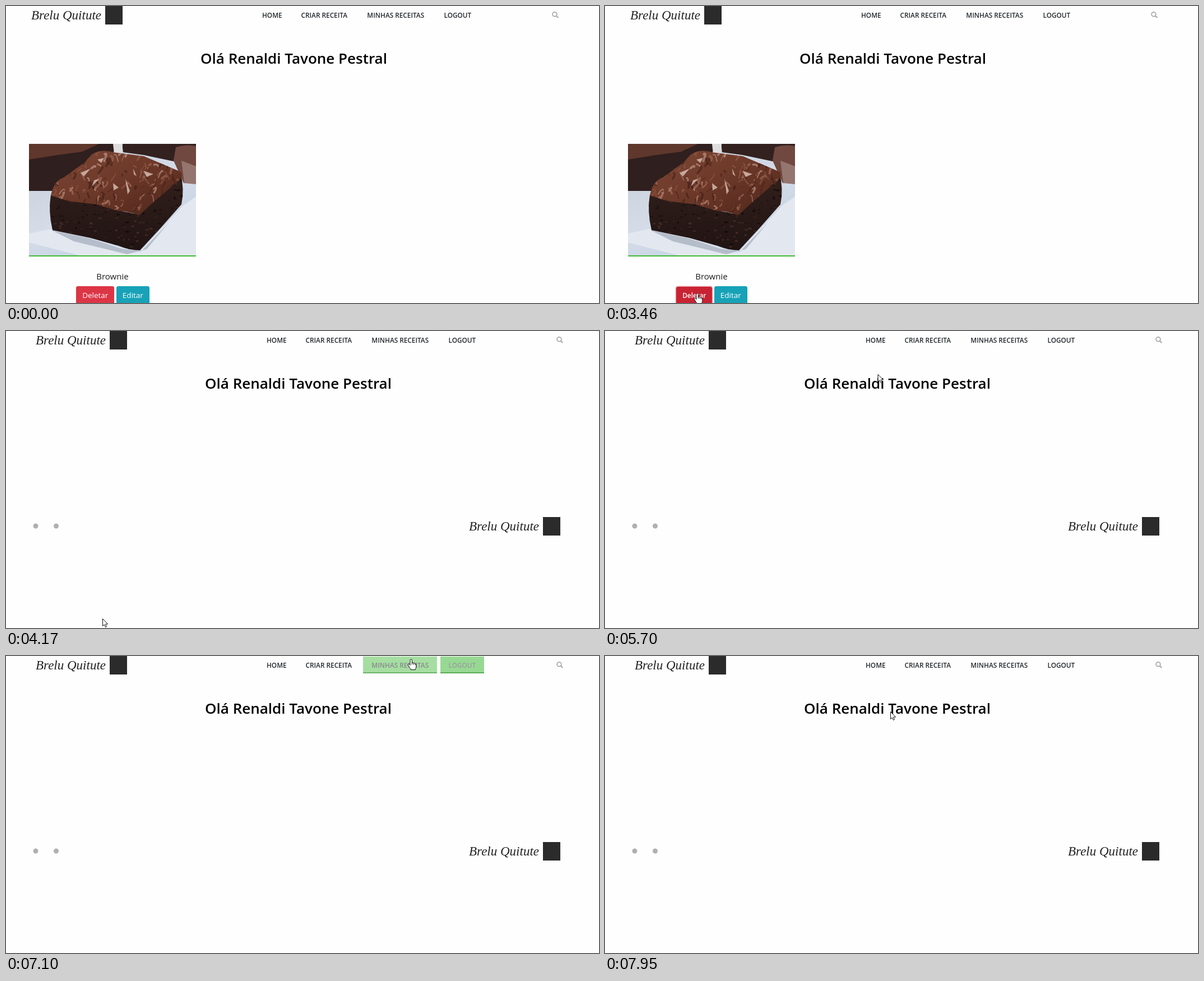
An HTML page that plays this animation: 1058 by 530 pixels, repeating every 8000 ms.

```html
<!DOCTYPE html>
<html lang="pt-BR">
<head>
<meta charset="utf-8">
<title>Minhas receitas</title>
<style>
@property --h { syntax: '<number>'; inherits: true; initial-value: 0; }
html, body { margin: 0; width: 100%; height: 100%; overflow: hidden; background: #fefefe; }
#stage { position: relative; width: 1058px; height: 530px; overflow: hidden; background: #fefefe;
  font-family: "Open Sans", sans-serif; }
#stage * { box-sizing: border-box; }
.abs, nav span { position: absolute; white-space: nowrap; }
svg { position: absolute; overflow: visible; }
[class*="run"] { animation: 8s linear infinite; }

/* page: blank on reload, then a 400 ms fade */
.run-page { inset: 0; animation-name: page; animation-timing-function: cubic-bezier(.37, 0, .63, 1); }
@keyframes page {
  0%, 44.62% { opacity: 1; }
  44.63%, 45.5% { opacity: 0; }
  50.5%, 92.49% { opacity: 1; }
  92.5%, 93.5% { opacity: 0; }
  98.5%, 100% { opacity: 1; }
}
.run-shift { inset: 0; animation-name: shift; animation-timing-function: step-end; }
@keyframes shift { 0% { transform: none; } 44.63%, 100% { transform: translateX(8px); } }
.run-card { left: 41px; top: 246px; width: 298px; animation-name: card; animation-timing-function: step-end; }
@keyframes card { 0% { visibility: visible; } 44.63%, 100% { visibility: hidden; } }
.run-foot { left: 0; top: 0; animation-name: foot; animation-timing-function: step-end; }
@keyframes foot { 0% { visibility: hidden; } 44.63%, 100% { visibility: visible; } }

/* header */
.brand { font: italic 23px "Liberation Serif", serif; fill: #222; }
h1 { top: 75px; width: 1027px; margin: 0; text-align: center; font-size: 26px; font-weight: 600;
  line-height: 36px; color: #000; }
nav span { top: 1px; height: 30px; padding: 1px 15px 0; line-height: 28px; font-size: 11.8px; font-weight: 600;
  border-bottom: 2px solid rgb(39 134 32 / var(--h)); background: rgb(64 186 55 / var(--h));
  color: rgb(calc(35 + 220 * var(--h)) calc(40 + 215 * var(--h)) calc(45 + 210 * var(--h)));
  animation-timing-function: ease; }
nav .run-home { left: 442px; animation-name: home; }
nav .run-new { left: 511.5px; animation-name: new; }
nav .run-mine { left: 629.3px; animation-name: mine; }
nav .run-out { left: 766.5px; animation-name: out; }
@keyframes home { 0%, 76.25% { --h: 0; } 76.9% { --h: .1; } 77.5%, 100% { --h: 0; } }
@keyframes new { 0%, 76.9% { --h: 0; } 78.5% { --h: .5; } 81.6%, 100% { --h: 0; } }
@keyframes mine {
  0%, 78.5% { --h: 0; } 80.4% { --h: .62; } 84.3%, 85.9% { --h: 0; }
  92.15%, 92.49% { --h: 1; } 92.5%, 100% { --h: 0; }
}
@keyframes out { 0%, 80.4% { --h: 0; } 85.9% { --h: 1; } 92.15%, 100% { --h: 0; } }

/* recipe card */
.photo { width: 298px; height: 198.5px; overflow: hidden; }
.line { top: 198.5px; width: 298px; height: 2.3px; background: #40ba37; }
.name { top: 226px; width: 298px; text-align: center; font-size: 15px; line-height: 20px; color: #1c1c1c; }
.buttons { top: 254px; width: 299px; height: 33px; display: flex; gap: 3.5px; justify-content: center; align-items: center; }
.buttons span { padding: 6.3px 11px; border-radius: 3.4px; font-size: 13.5px; line-height: 1.5; color: #fff;
  animation-timing-function: step-end, ease, linear; }
.buttons .run-del { background: #dc3545; animation-name: delFont, delFill, ring; }
.buttons .run-edit { background: #17a2b8; animation-name: editFont, editFill; }
@keyframes delFont { 0% { font-size: 13.5px; font-weight: 400; } 27.4%, 100% { font-size: 11.8px; font-weight: 600; } }
@keyframes delFill { 0%, 27.4% { background: #dc3545; } 33.6%, 100% { background: #c82333; } }
@keyframes ring {
  0%, 41.2% { box-shadow: 0 0 0 0 rgb(225 83 97 / .5); }
  45%, 100% { box-shadow: 0 0 0 2.7px rgb(225 83 97 / .5); }
}
@keyframes editFont {
  0% { font-size: 13.5px; font-weight: 400; }
  18.2% { font-size: 11.8px; font-weight: 600; }
  27%, 100% { font-size: 13.5px; font-weight: 400; }
}
@keyframes editFill { 0%, 18.2% { background: #17a2b8; } 24.4%, 27% { background: #138496; } 28.9%, 100% { background: #17a2b8; } }

/* pointer */
.run-pointer { left: 0; top: 0; width: 1px; height: 1px; animation-name: pointer; }
@keyframes pointer {
  0%, 13.3% { transform: translate(86px, 545px); }
  13.4% { transform: translate(86px, 522px); }
  15% { transform: translate(150px, 461px); }
  16.6% { transform: translate(267px, 478px); }
  18.5% { transform: translate(236px, 508px); }
  23%, 25% { transform: translate(220px, 506px); }
  27.2% { transform: translate(194px, 509px); }
  31.6%, 38.5% { transform: translate(168px, 511px); }
  43.25%, 45.4% { transform: translate(165px, 513px); }
  48.25%, 52.3% { transform: translate(172px, 513px); animation-timing-function: ease-in-out; }
  58.75% { transform: translate(758px, 133px); }
  60.7%, 66.4% { transform: translate(769px, 113px); }
  69.4%, 71.2% { transform: translate(486px, 78px); }
  74.1%, 75.8% { transform: translate(510px, 30px); }
  76.9% { transform: translate(519px, 24px); }
  78.5% { transform: translate(637px, 14px); }
  80.4% { transform: translate(774px, 8px); }
  81%, 83.5% { transform: translate(822px, 6px); }
  85.9% { transform: translate(773px, 8px); }
  88%, 92.5% { transform: translate(723px, 6px); }
  96.5% { transform: translate(600px, 78px); }
  99.3%, 100% { transform: translate(509px, 99px); }
}
.run-arrow, .run-hand { stroke: #111; fill: #fff; stroke-linejoin: round; }
.run-pointer .run-arrow { animation-name: arrow; animation-timing-function: step-end; }
.run-pointer .run-hand { animation-name: hand; animation-timing-function: step-end; }
@keyframes arrow {
  0% { opacity: 0; } 13.4% { opacity: 1; } 18.2% { opacity: 0; }
  44.63% { opacity: 1; } 76.25% { opacity: 0; } 92.5%, 100% { opacity: 1; }
}
@keyframes hand {
  0% { opacity: 0; } 18.2% { opacity: 1; } 44.63% { opacity: 0; }
  76.25% { opacity: 1; } 92.5%, 100% { opacity: 0; }
}
</style>
</head>
<body>
<div id="stage">
  <div class="abs run-page">
    <div class="abs run-shift">
      <svg width="1" height="1">
        <g id="brand">
          <text class="brand" x="45" y="24">Brelu Quitute</text>
          <rect x="177" y="0" width="31" height="33" fill="#2b2b2b"/>
        </g>
        <g fill="none" stroke="#aaa" stroke-width="1.8">
          <circle cx="979" cy="14.8" r="3.9"/><path d="M981.8 17.6l3.6 3.4" stroke-width="2.2"/>
        </g>
      </svg>
      <nav>
        <span class="run-home">HOME</span>
        <span class="run-new">CRIAR RECEITA</span>
        <span class="run-mine">MINHAS RECEITAS</span>
        <span class="run-out">LOGOUT</span>
      </nav>
      <h1 class="abs">Olá Renaldi Tavone Pestral</h1>
    </div>

    <svg class="run-foot" width="1" height="1">
      <use href="#brand" x="781" y="332"/>
      <g fill="#b0b0b0"><circle cx="53" cy="348" r="4.5"/><circle cx="89.5" cy="348" r="4.5"/></g>
    </svg>

    <div class="abs run-card">
      <svg class="photo" viewBox="0 0 298 198.5">
        <defs>
          <linearGradient id="paper" x2=".6" y2="1"><stop stop-color="#c3ccd8"/><stop offset=".6" stop-color="#d5dce8"/><stop offset="1" stop-color="#c3d2e4"/></linearGradient>
          <linearGradient id="glaze" x2="1" y2="1"><stop stop-color="#7d4735"/><stop offset=".5" stop-color="#6c3828"/><stop offset="1" stop-color="#4c251b"/></linearGradient>
          <linearGradient id="side" y2="1" x2="0"><stop stop-color="#33201c"/><stop offset="1" stop-color="#201413"/></linearGradient>
          <clipPath id="topClip"><path id="top" d="M39 92Q44 66 62 60L98 34 112 19Q130 8 150 15L205 22 271 50Q277 58 262 70L222 104 196 128Q180 120 160 120L120 108 70 102Z"/></clipPath>
          <clipPath id="sideClip"><path id="body" d="M39 91L70 101 120 107 160 119 196 126 222 103 270 52Q278 80 272 108L235 150 198 190Q180 190 160 182L110 168 42 154Q34 120 39 91Z"/></clipPath>
        </defs>
        <rect width="298" height="199" fill="url(#paper)"/>
        <path d="M0 0H155V12L110 40 45 84 0 84Z" fill="#2f1f1e"/>
        <path d="M0 0H125L95 14 50 20 0 28Z" fill="#5f372c"/>
        <path d="M166 0H298V20L262 32 205 20 168 15Z" fill="#33211f"/>
        <path d="M150 0H167L166 18H152Z" fill="#dedede"/>
        <path d="M262 6Q280 0 298 4V68L276 70 258 30Z" fill="#70483f"/>
        <path d="M272 30L298 40V72L277 70Z" fill="#947570"/>
        <path d="M38 152L110 168 160 184 197 193 275 110 298 94V199H90L0 176V160Z" fill="#e3e8f0"/>
        <path d="M40 154L110 169 165 187 200 192 250 140 210 188 175 197 80 174Z" fill="#98a2b2" opacity=".6"/>
        <use href="#body" fill="url(#side)"/>
        <g id="crumbs" clip-path="url(#sideClip)"></g>
        <use href="#top" fill="url(#glaze)"/>
        <g id="crinkles" clip-path="url(#topClip)" fill="none" stroke-linecap="round"></g>
        <path d="M122 28l12-3-5 9zM92 52l18-8-12 14zM172 62l8 22-4 6zM150 70l10 8-9 5zM204 48l18 6-12 5zM126 62l-14 14 4-11zM186 44l6 14-5-4z" fill="#ddc2b8" opacity=".8"/>
      </svg>
      <div class="abs line"></div>
      <div class="abs name">Brownie</div>
      <div class="abs buttons"><span class="run-del">Deletar</span><span class="run-edit">Editar</span></div>
    </div>
  </div>

  <svg class="run-pointer">
    <path class="run-arrow" d="M.5 .5V13.6L3.4 10.9 5.4 15.4 7.6 14.4 5.6 10H9.6Z"/>
    <g class="run-hand">
      <path d="M-2 1.5a1.7 1.7 0 0 1 3.4 0V7q0-1 1.4-1t1.6 1.2q.2-.9 1.4-.7t1.4 1.4q1.6-.4 1.6 1.4v4q0 2-1.4 4v1.2H-1v-1.2q-2-2-3-4.4l-2-3q-.6-1.6 1-1.8 1.2 0 3 2.4z"/>
      <path d="M1.4 7v2.5M4.4 7.2v2.5M7.2 8v2" fill="none"/>
    </g>
  </svg>
</div>
<script>
let seed = 17;
const rnd = (a, b) => {
  seed = (seed * 16807) % 2147483647;
  return +(a + (b - a) * seed / 2147483647).toFixed(1);
};
const pick = list => list[Math.floor(rnd(0, list.length - .1))];
const fill = (id, n, make) => {
  document.getElementById(id).innerHTML = Array.from({ length: n }, make).join('');
};
fill('crumbs', 190, () =>
  `<ellipse cx="${rnd(36, 276)}" cy="${rnd(55, 190)}" rx="${rnd(1, 4)}" ry="${rnd(.6, 2)}" fill="${pick(['#150c0c', '#1a100f', '#3c2620', '#432b25'])}"/>`);
fill('crinkles', 190, () =>
  `<path d="M${rnd(40, 270)} ${rnd(12, 125)}q${rnd(-4, 6)} ${rnd(-6, 4)} ${rnd(-10, 8)} ${rnd(2, 14)}" stroke="${pick(['#43201a', '#4e2519', '#8a523f', '#a06a58', '#bd9284'])}" stroke-width="${rnd(.8, 4)}" opacity=".7"/>`);
</script>
</body>
</html>
```
